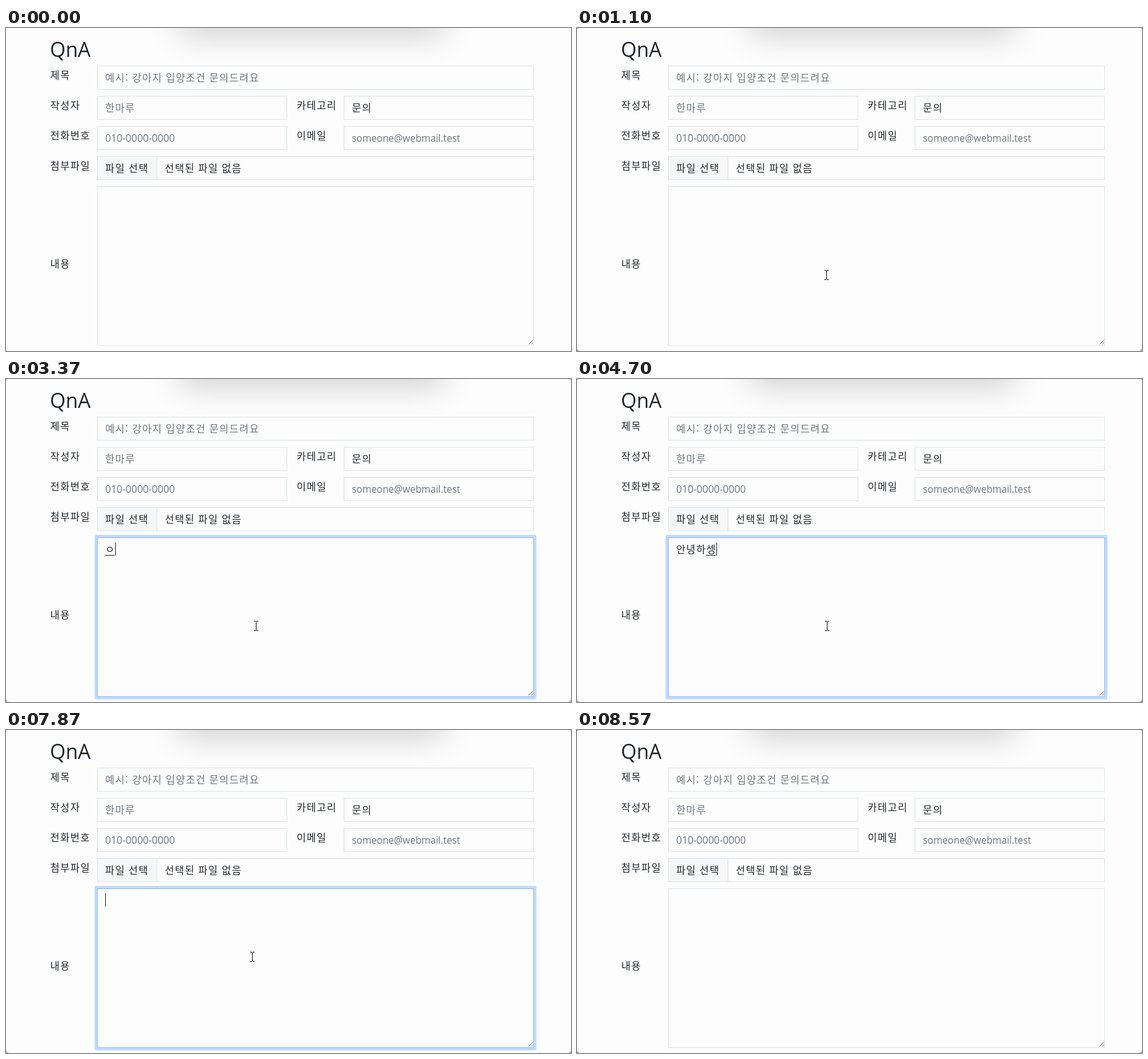
Recreate the animation shown at these times as an HTML page. Size 900 px wide and 514 px high, loop 8.61 s.

```html
<!DOCTYPE html>
<html lang="ko">
<head>
<meta charset="utf-8">
<title>QnA</title>
<style>
html, body { margin: 0; width: 100%; height: 100%; overflow: hidden; background: #fdfdfd; }
#shade {
  position: absolute; left: 277px; top: -204px; width: 420px; height: 200px;
  box-shadow: 0 16px 48px rgba(0, 0, 0, .175);
}
svg { position: absolute; left: 0; top: 0; display: block; }
text { font: 16px "Noto Sans CJK KR", "Noto Sans CJK", "Noto Sans CJK JP", sans-serif; fill: #212529; letter-spacing: 1.28px; word-spacing: -.4px; white-space: pre; }
.latin { font-family: "Open Sans", "Noto Sans", sans-serif; letter-spacing: 0; }
.hint { fill: #6c757d; }
.box { fill: none; stroke: #dee2e6; }
.line { fill: #212529; }
</style>
</head>
<body>
<div id="shade"></div>
<svg id="stage" width="900" height="514" viewBox="0 0 900 514">
  <g id="form"></g>
  <path d="M832.5 503.5l7-7M836.5 503.5l3-3" stroke="#777" fill="none"/>
  <g id="ring" fill="none">
    <rect x="143" y="250" width="700" height="258" rx="1" stroke="#c2dbfe" stroke-width="4"/>
    <rect x="145.5" y="252.5" width="695" height="253" stroke="#86b7fe"/>
  </g>
  <text id="typed" x="158" y="277"></text>
  <rect id="under" class="line" y="280" width="15" height="1"/>
  <rect id="caret" class="line" width="1" height="21"/>
  <path id="corners" fill="#b4b6b8" fill-rule="evenodd"
    d="M0 0H900V514H0ZM4 0Q0 0 0 4V507Q0 514 7 514H893Q900 514 900 507V4Q900 0 896 0Z"/>
  <g id="mouse" fill="none">
    <path d="M-3.5 -7.5H-1.5L.5 -6.5L2.5 -7.5H4.5M.5 -7V7M-3.5 7.5H-1.5L.5 6.5L2.5 7.5H4.5" stroke="#fff" stroke-width="2" opacity=".6"/>
    <path d="M-3 -7.5H0M1 -7.5H4M.5 -7V7M-3 7.5H0M1 7.5H4" stroke="#111"/>
  </g>
</svg>
<script>
const LOOP = 8610, LEFT = 158, STEP = 16;
const $ = id => document.getElementById(id);
const form = $("form");

function add(tag, attrs, content = "") {
  const el = document.createElementNS("http://www.w3.org/2000/svg", tag);
  for (const k in attrs) el.setAttribute(k, attrs[k]);
  el.textContent = content;
  form.append(el);
}
const label = (x, y, s, cls = "") => add("text", { x, y, class: cls }, s);
const box = (x, y, w, h) => add("rect", { x: x + .5, y: y + .5, width: w - 1, height: h - 1, class: "box" });

add("rect", { x: 146, y: 205, width: 94, height: 36, fill: "#f6f7f8" });
add("rect", { x: 240, y: 205, width: 1, height: 36, fill: "#dee2e6" });
box(145, 60, 696, 38);
for (const y of [108, 156]) {
  box(145, y, 303, 38);
  box(538, y, 303, 38);
}
box(145, 204, 696, 38);
box(145, 252, 696, 254);

add("text", { x: 70, y: 46, class: "latin", style: "font-size:32px" }, "QnA");
label(70.5, 81, "제목");
label(70.5, 129, "작성자");
label(70.5, 177, "전화번호");
label(70.5, 225, "첨부파일");
label(70.5, 381, "내용");
label(463, 129, "카테고리");
label(463, 177, "이메일");
label(158, 85, "예시: 강아지 입양조건 문의드려요", "hint");
label(158, 133, "한마루", "hint");
label(158, 181, "010-0000-0000", "hint latin");
add("text", { x: 551, y: 181, class: "hint latin", style: "font-size:15.4px" }, "someone@webmail.test");
label(551, 133, "문의");
label(158, 229, "파일 선택");
label(253, 229, "선택된 파일 없음");

// time, text, caret line (0 = hidden), last syllable still composing
const typing = [
  [0, "", 0], [1170, "", 1], [1670, "", 0], [2200, "", 1],
  [2700, "d", 1], [3100, "", 1],
  [3370, "ㅇ", 1, 1], [3470, "아", 1, 1], [3570, "안", 1, 1], [3700, "안ㄴ", 1, 1],
  [3930, "안녀", 1, 1], [4000, "안녕", 1, 1],
  [4200, "안녕ㅎ", 1, 1], [4300, "안녕하", 1, 1], [4400, "안녕핫", 1, 1],
  [4570, "안녕하세", 1, 1], [4700, "안녕하셍", 1, 1],
  [4870, "안녕하세요", 1, 1], [5400, "안녕하세요", 0, 1],
  [6170, "안녕하세요", 2], [6700, "안녕하세요", 0], [7100, "안녕하세요", 1],
  [7600, "안녕하세", 1], [7630, "안녕하", 1], [7670, "안녕", 1], [7700, "안", 1],
  [7730, "", 1], [8270, "", 0]
];
// time, x, y of the pointer on its way out
const leaving = [[1400, 398, 393], [7870, 392, 361], [7900, 376, 268], [7930, 351, 150], [7970, 315, 30], [8000, 0, -40]];

const ramp = (t, a, b) => Math.min(1, Math.max(0, (t - a) / (b - a)));
const smooth = p => p * p * (3 - 2 * p);
const at = (rows, t) => rows.findLast(r => r[0] <= t);

function pointer(t) {
  if (t < 700) return [0, -40];
  if (t >= 1400) return at(leaving, t).slice(1);
  const p = 1 - (1 - ramp(t, 670, 1070)) ** 2;
  return [Math.round(360 + 37 * p), Math.round(-10 + 403 * p)];
}

function draw(t) {
  const [, text, line, composing] = at(typing, t);
  const end = text === "d" ? LEFT + 9 : LEFT + STEP * text.length;
  const typed = $("typed"), caret = $("caret"), under = $("under");
  if (typed.textContent !== text) typed.textContent = text;
  typed.setAttribute("class", text === "d" ? "latin" : "");
  caret.setAttribute("x", line === 2 ? LEFT : end);
  caret.setAttribute("y", line === 2 ? 284 : 260);
  caret.setAttribute("opacity", line ? 1 : 0);
  under.setAttribute("x", end - STEP);
  under.setAttribute("opacity", composing ? 1 : 0);
  $("mouse").setAttribute("transform", `translate(${pointer(t)})`);
  $("ring").setAttribute("opacity", smooth(ramp(t, 1100, 1200)) * (1 - smooth(ramp(t, 8470, 8570))));
  $("corners").setAttribute("opacity", ramp(t, 30, 270));
}

const start = performance.now();
function tick() {
  draw((performance.now() - start) % LOOP);
  requestAnimationFrame(tick);
}
tick();
</script>
</body>
</html>
```
